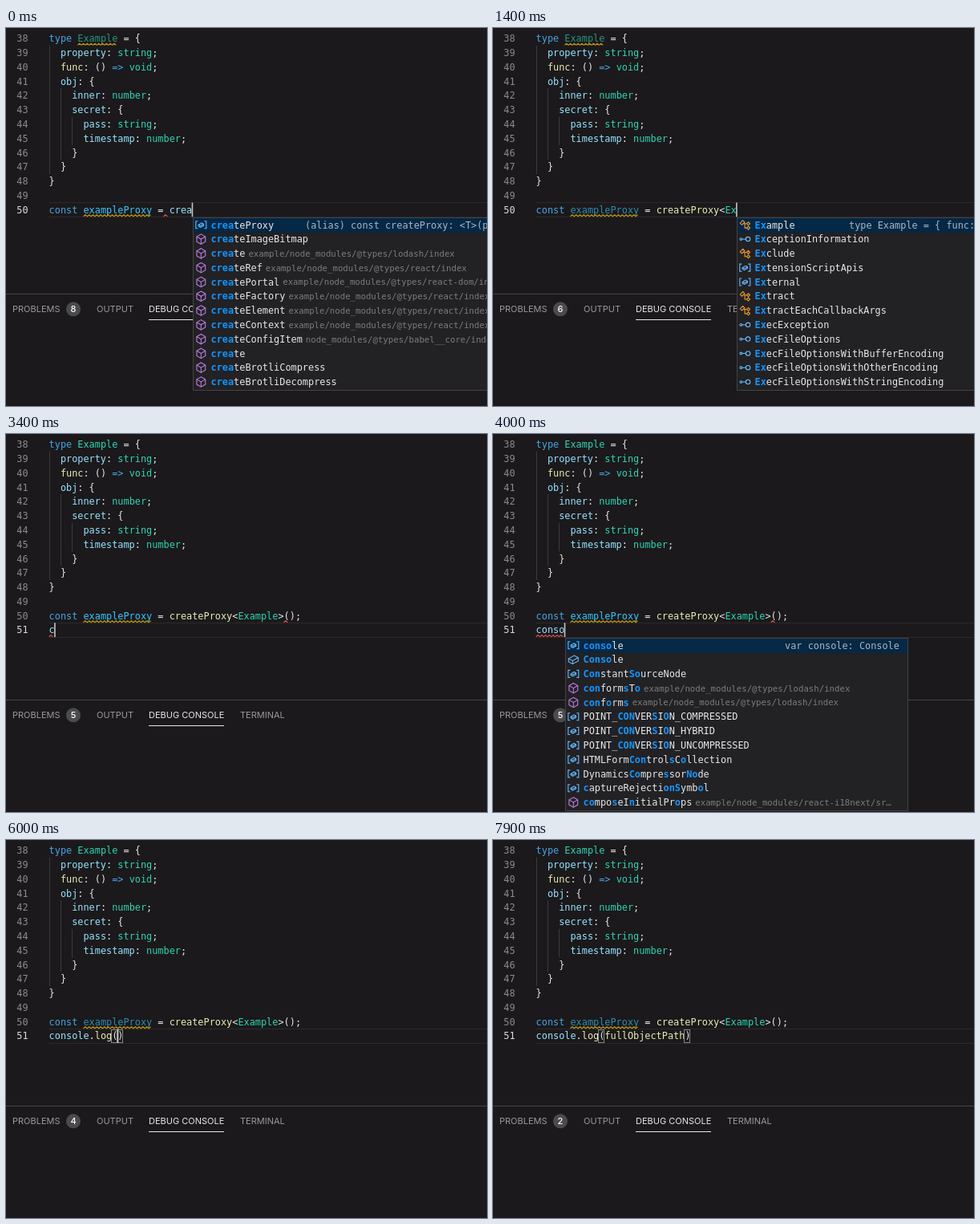
An HTML page with a canvas that plays this animation: 600 by 471 pixels, repeating every 8000 ms.

```html
<!DOCTYPE html>
<html lang="en">
<head>
<meta charset="utf-8">
<style>
html, body { margin: 0; width: 100%; height: 100%; overflow: hidden; background: #1b191b; }
canvas { display: block; }
</style>
</head>
<body>
<canvas id="stage" width="600" height="471"></canvas>
<script>
const ctx = document.getElementById('stage').getContext('2d');
const LOOP = 8000, LEFT = 53.6, CHAR = 7.146, ROW = 17.79, POPUP_WIDTH = 428;
const MONO = '"DejaVu Sans Mono", monospace';
const CODE = '11.87px ' + MONO;
const color = {
  bg: '#1b191b', text: '#e8e8e8', key: '#44a6e4', type: '#2ad6b4', prop: '#94e4ff',
  fn: '#ebebb2', constant: '#34c8ff', warn: '#c29a08', error: '#f0504a',
  purple: '#b97ee0', blue: '#62bdff', orange: '#f09a26', match: '#1097ff'
};

const source = [
  'type Example = {', '  property: string;', '  func: () => void;', '  obj: {',
  '    inner: number;', '    secret: {', '      pass: string;', '      timestamp: number;',
  '    }', '  }', '}', ''
];

// Rows: icon, label with matched letters between asterisks, optional path.
const types = 'example/node_modules/@types/';
const menus = {
  create: {
    detail: '(alias) const createProxy: <T>(proxy:…',
    rows: ['v *crea*teProxy', 'm *crea*teImageBitmap', `m *crea*te ${types}lodash/index`,
      `m *crea*teRef ${types}react/index`, `m *crea*tePortal ${types}react-dom/index`,
      `m *crea*teFactory ${types}react/index`, `m *crea*teElement ${types}react/index`,
      `m *crea*teContext ${types}react/index`, 'm *crea*teConfigItem node_modules/@types/babel__core/index',
      'm *crea*te', 'm *crea*teBrotliCompress', 'm *crea*teBrotliDecompress']
  },
  example: {
    detail: 'type Example = { func: () => void; obj…',
    rows: ['c *Ex*ample', 'i *Ex*ceptionInformation', 'c *Ex*clude', 'v *Ex*tensionScriptApis',
      'v *Ex*ternal', 'c *Ex*tract', 'c *Ex*tractEachCallbackArgs', 'i *Ex*ecException',
      'i *Ex*ecFileOptions', 'i *Ex*ecFileOptionsWithBufferEncoding',
      'i *Ex*ecFileOptionsWithOtherEncoding', 'i *Ex*ecFileOptionsWithStringEncoding']
  },
  console: {
    detail: 'var console: Console',
    rows: ['v *conso*le', 'f *Conso*le', 'v *Con*stant*So*urceNode',
      `m *con*form*s*T*o* ${types}lodash/index`, `m *con*f*o*rm*s* ${types}lodash/index`,
      'v POINT_*CON*VER*S*I*O*N_COMPRESSED', 'v POINT_*CON*VER*S*I*O*N_HYBRID',
      'v POINT_*CON*VER*S*I*O*N_UNCOMPRESSED', 'v HTMLForm*Con*trol*s*C*o*llection',
      'v Dynamics*Co*mpre*s*sor*No*de', 'v *c*aptureRejecti*onS*ymb*o*l',
      'm *co*mpo*s*eI*n*itialPr*o*ps example/node_modules/react-i18next/sr…']
  },
  members: {
    detail: '(method) Console.assert(value: any, m…',
    rows: ['assert', 'clear', 'count', 'countReset', 'debug', 'dir', 'dirxml', 'error',
      'group', 'groupCollapsed', 'groupEnd', 'info'].map(s => 'm ' + s)
  },
  l: {
    detail: '(method) Console.log(...data: any[]):…',
    rows: ['m *l*og', 'm time*L*og', 'm c*l*ear', 'm tab*l*e', 'f Conso*l*e', 'm dirxm*l*',
      'm profi*l*e', 'm profi*l*eEnd', 'm groupCo*l*lapsed']
  },
  lo: { detail: '(method) Console.log(...data: any[]):…', rows: ['m *lo*g', 'm time*Lo*g'] },
  full: {
    detail: '(alias) const fullObjectPath: <T>(pro…',
    rows: ['v *fu*llObjectPath', 'v *fu*nction', 'v *Fu*nction', 'm *fu*nctions',
      `m *fu*nctions ${types}lodash/index`, `m *fu*nctionsIn ${types}lodash/index`,
      `c *Fu*nctionComponent ${types}react/index`, `i *Fu*nctionComponentElement ${types}react/index`,
      `i *Fu*nctionComponentFactory ${types}react/index`, 'v *F*oc*u*sEvent', 'v *F*ormDataEvent*u*', 'v *f*oc*u*s']
  }
};

// Keystrokes: start, line, text ("|" is the caret), menu, typed letters.
const head = 'const exampleProxy = ', call = head + 'createProxy<Example>();';
const keys = [
  [0, 50, head + 'crea|', 'create', 4],
  [300, 50, head + 'createProxy|'],
  [800, 50, head + 'createProxy<|'],
  [1100, 50, head + 'createProxy<E|', 'example', 1],
  [1300, 50, head + 'createProxy<Ex|', 'example', 2],
  [1700, 50, head + 'createProxy<Example|'],
  [2000, 50, head + 'createProxy<Example>|'],
  [2300, 50, head + 'createProxy<Example>(|)'],
  [2500, 50, head + 'createProxy<Example>()|'],
  [2800, 50, call + '|'],
  [3100, 51, '|'],
  [3400, 51, 'c|'],
  [3500, 51, 'co|', 'console', 2],
  [3700, 51, 'con|', 'console', 3],
  [3800, 51, 'cons|', 'console', 4],
  [3900, 51, 'conso|', 'console', 5],
  [4200, 51, 'console|'],
  [4400, 51, 'console.|', 'members', 0],
  [4600, 51, 'console.l|', 'l', 1],
  [4800, 51, 'console.lo|', 'lo', 2],
  [5000, 51, 'console.log|'],
  [5600, 51, 'console.log(|)'],
  [6500, 51, 'console.log(f|)', 'full', 1],
  [6700, 51, 'console.log(fu|)', 'full', 2],
  [7000, 51, 'console.log(fullObjectPath|)']
];
const problems = [[0, 8], [700, 6], [2400, 5], [5700, 4], [7500, 2]];

const latest = (list, t) => list.filter(k => k[0] <= t).pop();
const during = (t, a, b) => t >= a && t < b;
const lineY = n => 13 + (n - 38) * ROW;
const colX = c => LEFT + c * CHAR;

function write(s, x, y, fill, font = CODE) {
  ctx.font = font;
  ctx.fillStyle = fill;
  ctx.fillText(s, x, y);
}

function rect(x, y, w, h, fill) {
  ctx.fillStyle = fill;
  ctx.fillRect(x, y, w, h);
}

function path(points, close) {
  ctx.beginPath();
  points.forEach(([x, y]) => ctx.lineTo(x, y));
  if (close) ctx.closePath();
  ctx.stroke();
}

function dot(x, y, r) {
  ctx.beginPath();
  ctx.arc(x, y, r, 0, 7);
  ctx.stroke();
}

function squiggle(col, count, line, stroke) {
  const points = [], y = lineY(line) + 7.3;
  for (let x = 0, i = 0; x <= count * CHAR; x += 2.4, i++) points.push([colX(col) + x, y + (i % 2 ? -1 : 1)]);
  ctx.strokeStyle = stroke;
  ctx.lineWidth = 1.1;
  path(points);
}

const rules = [
  [/^(type|const|=>)$/, color.key],
  [/^(string|number|void|Example|Ex?)$/, color.type],
  [/^exampleProxy$/, color.constant],
  [/^(func|createProxy|fullObjectPath)$/, color.fn],
  [/^\w+$/, color.prop]
];

function codeLine(s, line, faded) {
  for (const m of s.matchAll(/\w+|=>|[^\s\w]/g)) {
    const word = m[0], rule = rules.find(r => r[0].test(word));
    const called = word === 'log' && s[m.index + 3] === '(';
    ctx.globalAlpha = word === faded ? 0.667 : 1;
    write(word, colX(m.index), lineY(line) + 4.2, called ? color.fn : rule ? rule[1] : color.text);
  }
  ctx.globalAlpha = 1;
}

function cube(r, h) {
  path([[0, -h], [r, -h / 2], [r, h / 2], [0, h], [-r, h / 2], [-r, -h / 2]], true);
  path([[-r, -h / 2], [0, 0], [r, -h / 2]]);
  path([[0, 0], [0, h]]);
}

const icons = {
  m() { ctx.strokeStyle = color.purple; cube(5.4, 6.2); },
  f() {
    ctx.strokeStyle = color.blue;
    path([[-6, -1.2], [1, -5], [6, -2.4], [6, 1.8], [-1, 5.4], [-6, 2.8]], true);
    path([[-6, -1.2], [-1, 1.3], [6, -2.4]]);
    path([[-1, 1.3], [-1, 5.4]]);
  },
  v() {
    ctx.strokeStyle = color.blue;
    for (const s of [-1, 1]) path([[4 * s, -4.5], [6.5 * s, -4.5], [6.5 * s, 4.5], [4 * s, 4.5]]);
    path([[-3.2, 0], [.8, -2.4], [3.2, -1], [3.2, .8], [-.8, 3], [-3.2, 1.6]], true);
    path([[-3.2, 0], [-.8, 1.2], [3.2, -1]]);
  },
  i() {
    ctx.strokeStyle = color.blue;
    dot(-5, 0, 1.3);
    path([[-3.5, 0], [1, 0]]);
    dot(3.8, 0, 2.7);
  },
  c() {
    ctx.strokeStyle = color.orange;
    path([[-6, -2.2], [-2.6, -5.6], [-.4, -3.4], [-3.8, 0]], true);
    path([[-2, -1.5], [2.5, -1.5]]);
    path([[-.2, -1.5], [-.2, 3.8], [2.5, 3.8]]);
    for (const y of [-1.5, 3.8]) path([[2.2, y], [4.2, y - 2], [6.2, y], [4.2, y + 2]], true);
  }
};

function menuRow(row, x, y, typed) {
  const [icon, label, from] = row.split(' ');
  ctx.save();
  ctx.translate(x + 10.3, y);
  ctx.lineWidth = 1.1;
  icons[icon]();
  ctx.restore();
  let at = x + 22.5;
  label.split('*').forEach((part, i) => {
    for (const ch of part) {
      const hit = i % 2 && typed-- > 0;
      write(ch, at, y + 4.2, hit ? color.match : color.text, (hit ? 'bold ' : '') + CODE);
      at += CHAR;
    }
  });
  if (from) write(from, at + 4, y + 4, '#7d7c7e', '10.7px ' + MONO);
}

function popup({ rows, detail }, x, line, typed) {
  const top = Math.round(lineY(line) + 10), h = Math.round(rows.length * ROW + 3);
  x = Math.ceil(x);
  rect(x, top, POPUP_WIDTH, h, '#434245');
  ctx.save();
  ctx.beginPath();
  ctx.rect(x + 1, top + 1, POPUP_WIDTH - 2, h - 2);
  ctx.clip();
  rect(x, top, POPUP_WIDTH, h, '#222124');
  rect(x, top, POPUP_WIDTH, ROW + 1, '#042845');
  rows.forEach((row, i) => menuRow(row, x, top + 9.3 + i * ROW, typed));
  const indent = detail.endsWith('…') ? 140 : 417 - detail.length * CHAR;
  write(detail, x + indent, top + 13.5, '#a9b7c3');
  ctx.restore();
}

function panel(t) {
  rect(0, 331, 600, 1, '#444345');
  const ui = '11px Inter, sans-serif';
  write('PROBLEMS', 8, 354.3, '#9a999b', ui);
  write('OUTPUT', 113, 354.3, '#9a999b', ui);
  write('DEBUG CONSOLE', 178, 354.3, '#e7e7e7', ui);
  write('TERMINAL', 292, 354.3, '#9a999b', ui);
  rect(178, 363, 94, 1, '#e7e7e7');
  ctx.fillStyle = '#4b4a4c';
  ctx.beginPath();
  ctx.arc(84, 350.3, 9, 0, 7);
  ctx.fill();
  ctx.textAlign = 'center';
  write(latest(problems, t)[1], 84, 354.2, '#fff', '500 11px Inter, sans-serif');
  ctx.textAlign = 'left';
}

function draw(t) {
  const [start, line, raw, menu, typed] = latest(keys, t);
  const caret = raw.indexOf('|'), text = raw.replace('|', ''), y = lineY(line);
  rect(0, 0, 600, 471, color.bg);

  for (const edge of [-9, 8.5]) rect(LEFT, Math.round(y + edge), 547, 1, '#2b292b');
  for (const [col, first, last] of [[0, 39, 47], [2, 42, 46], [4, 44, 45]])
    rect(Math.round(colX(col)), lineY(first) - 9, 1, (last - first + 1) * ROW, '#3b3a3c');
  for (let n = 38; n <= line; n++) write(n, 13.3, lineY(n) + 4.2, n === line ? '#dadada' : '#8b8a8c');

  const unused = during(t, 700, 2100) || during(t, 5700, 6500) || t >= 7500;
  source.forEach((s, i) => codeLine(s, 38 + i, t < 2400 ? 'Example' : ''));
  codeLine(line === 50 ? text : call, 50, unused ? 'exampleProxy' : '');
  if (line === 51) codeLine(text, 51);

  if (t < 2400) squiggle(5, 7, 38, color.warn);
  squiggle(6, 12, 50, color.warn);
  if (t < 700) squiggle(20, 1, 50, color.error);
  if (during(t, 2700, 5300)) squiggle(41, 1, 50, color.error);
  if (during(t, 3400, 5300)) squiggle(0, text.length, 51, color.error);

  const open = text.lastIndexOf('(');
  if (line === 51 && open > 0) {
    ctx.strokeStyle = '#858585';
    ctx.lineWidth = 1;
    for (const col of [open, text.length - 1])
      ctx.strokeRect(Math.round(colX(col)) - .5, Math.round(y - 8) + .5, 7, 16);
  }

  panel(t);
  if ((t - start) % 1000 < 500 || menu) rect(colX(caret) - .6, y - 9, 1.6, ROW, '#c4c4c4');
  if (menu) popup(menus[menu], colX(caret), line, typed);
}

const begin = performance.now();
function tick() {
  draw((performance.now() - begin) % LOOP);
  requestAnimationFrame(tick);
}
tick();
</script>
</body>
</html>
```
